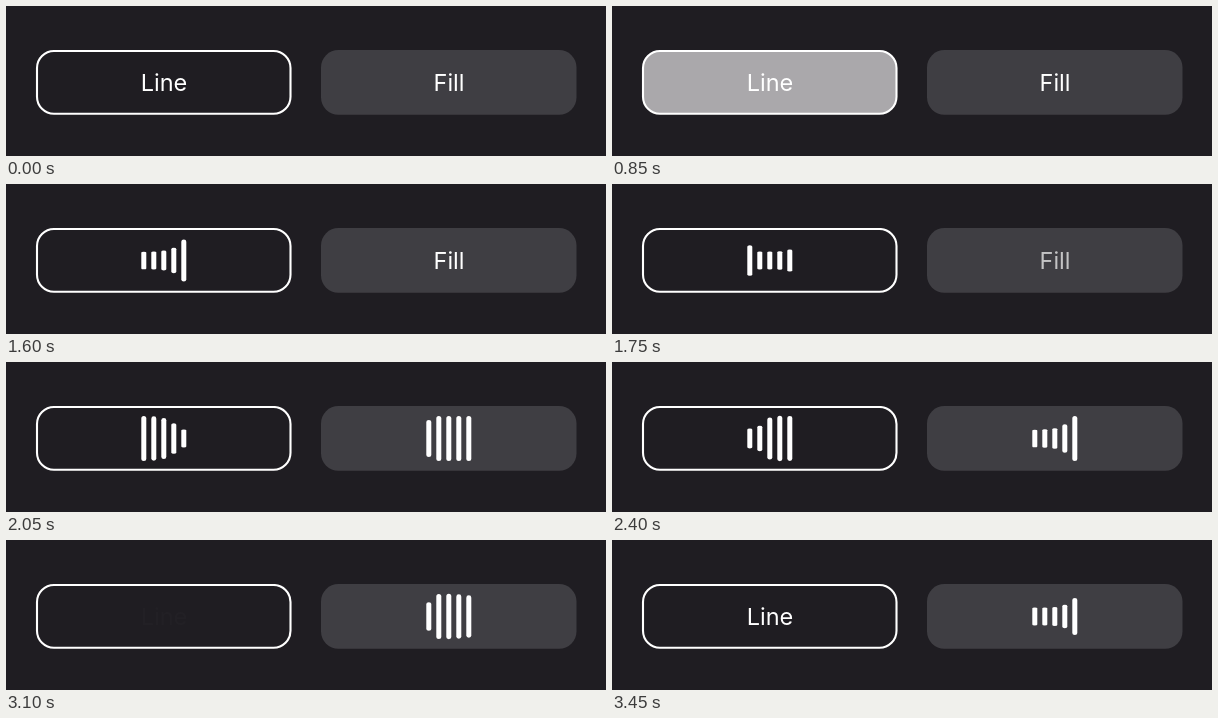
These frames come from a looping animation (600x150 px, 3.5 s). An HTML page:

```html
<!DOCTYPE html>
<html lang="en">
<head>
<meta charset="utf-8">
<title>Loading buttons</title>
<style>
  html, body { margin: 0; width: 100%; height: 100%; overflow: hidden; background: #1f1d22; }
  svg { display: block; width: 600px; height: 150px; }
  text { font: 400 23.5px Inter, Roboto, sans-serif; text-anchor: middle; fill: #fff; }
  .bars rect { fill: #fff; }
</style>
</head>
<body>
<svg viewBox="0 0 600 150">
  <g id="line">
    <rect class="body" x="31" y="45" width="253.5" height="62.8" rx="17" fill="none" stroke="#fff" stroke-width="2.1"/>
    <text x="158" y="85.4">Line</text>
    <g class="bars" transform="translate(157.8 76.5)"></g>
  </g>
  <g id="fill">
    <rect class="body" x="315" y="44" width="255.5" height="64.8" rx="17.5" fill="#3f3e43"/>
    <text x="443" y="85.4">Fill</text>
    <g class="bars" transform="translate(442.8 76.5)"></g>
  </g>
</svg>
<script>
const LOOP = 3500, TICK = 50;   // the picture advances 20 times a second
const FADE = 200, LOAD = 2000;  // label fade and loading time, ms
const BARS = 5, PITCH = 10, SIZE = 45;

function bezier(x1, y1, x2, y2) {
  const at = (a, b, s) => 3 * (1 - s) * (1 - s) * s * a + 3 * (1 - s) * s * s * b + s * s * s;
  return x => {
    let lo = 0, hi = 1;
    for (let i = 0; i < 24; i++) {
      const mid = (lo + hi) / 2;
      if (at(x1, x2, mid) < x) lo = mid; else hi = mid;
    }
    return at(y1, y2, lo);
  };
}

const easeIn = bezier(0.42, 0, 1, 1);
const easeOut = bezier(0, 0, 0.58, 1);
const pulse = bezier(0.2, 0.68, 0.18, 1.08);
const clamp = v => Math.min(1, Math.max(0, v));

function makeButton(id, times, idle, pressed) {
  const root = document.getElementById(id);
  const group = root.querySelector(".bars");
  const bars = Array.from({ length: BARS }, (_, i) => {
    const bar = document.createElementNS("http://www.w3.org/2000/svg", "rect");
    const attrs = { x: (i - 2) * PITCH - 2.5, y: -SIZE / 2, width: 5, height: SIZE, rx: 2.5 };
    for (const key in attrs) bar.setAttribute(key, attrs[key]);
    group.append(bar);
    return bar;
  });
  return { body: root.querySelector(".body"), label: root.querySelector("text"), group, bars, idle, pressed, ...times };
}

// Shrinks to 0.4 in the first half second, grows back in the second.
function barScale(ms) {
  if (ms < 0) return 1;
  const half = (ms % 1000) / 500;
  return half < 1 ? 1 - 0.6 * pulse(half) : 0.4 + 0.6 * pulse(half - 1);
}

function drawButton(b, t) {
  const start = b.release + FADE, end = start + LOAD;
  const held = t >= b.press && t < b.release;
  const loading = t >= start && t < end;
  b.body.setAttribute("fill", held ? b.pressed : b.idle);
  b.label.setAttribute("opacity", t < end
    ? 1 - easeOut(clamp((t - b.release) / FADE))
    : easeIn(clamp((t - end) / FADE)));
  b.group.setAttribute("visibility", loading ? "visible" : "hidden");
  b.bars.forEach((bar, i) =>
    bar.setAttribute("transform", `scale(1 ${barScale(t - start - 100 * (i + 1))})`));
}

const buttons = [
  makeButton("line", { press: 850, release: 885 }, "none", "#aaa8ab"),
  makeButton("fill", { press: 1650, release: 1710 }, "#3f3e43", "#2c2b30")
];
const origin = performance.now();

function frame() {
  const t = (performance.now() - origin) % LOOP;
  const shown = Math.floor(t / TICK) * TICK;
  buttons.forEach(b => drawButton(b, shown));
  requestAnimationFrame(frame);
}
frame();
</script>
</body>
</html>
```
